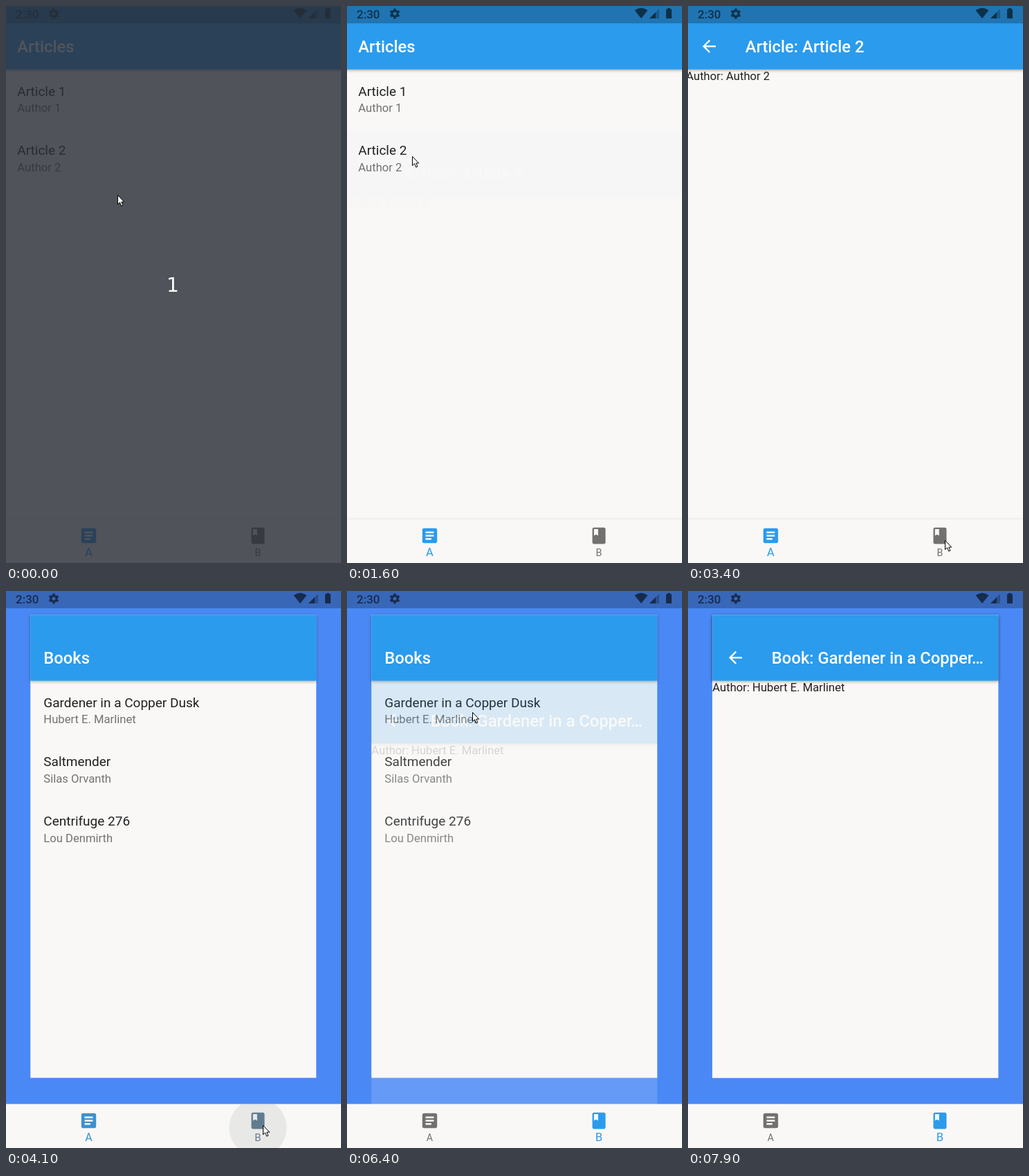
Recreate the animation shown at these times as an HTML page. Size 484 px wide and 805 px high, loop 8000 ms.

```html
<!DOCTYPE html>
<html lang="en">
<head>
<meta charset="utf-8">
<title>Nested navigation</title>
<style>
  html, body { margin: 0; width: 100%; height: 100%; overflow: hidden; background: #f9f8f7; }
  svg { display: block; width: 100vw; height: 100vh; }
  text { font-family: Roboto, sans-serif; }
  .paper { fill: #f9f8f7; }
  .bar { fill: #2b9bed; filter: drop-shadow(0 1.5px 2px rgba(0, 0, 0, .36)); }
  .heading { font-size: 20px; font-weight: 500; fill: #fff; }
  .title { font-size: 16px; fill: rgba(0, 0, 0, .87); }
  .subtitle { font-size: 14px; fill: rgba(0, 0, 0, .54); }
  .body { font-size: 14px; fill: rgba(0, 0, 0, .87); }
  .status { fill: #000; stroke: #000; stroke-width: 0; opacity: .58; }
  .label { text-anchor: middle; }
</style>
</head>
<body>
<svg id="stage" viewBox="0 0 484 805"></svg>
<script>
const LOOP = 8000, STEP = 100;
const SCREEN = { width: 411.4, navTop: 626.9, inset: 32 };
const BLUE = [43, 155, 237], GREY = [115, 113, 112];

const ICONS = {
  article: 'M19 3H5c-1.1 0-2 .9-2 2v14c0 1.1.9 2 2 2h14c1.1 0 2-.9 2-2V5c0-1.1-.9-2-2-2zm-5 14H7v-2h7v2zm3-4H7v-2h10v2zm0-4H7V7h10v2z',
  book: 'M18 2H6c-1.1 0-2 .9-2 2v16c0 1.1.9 2 2 2h12c1.1 0 2-.9 2-2V4c0-1.1-.9-2-2-2zM6 4h5v8l-2.5-1.5L6 12V4z',
  back: 'M20 11H7.83l5.59-5.59L12 4l-8 8 8 8 1.41-1.41L7.83 13H20v-2z'
};

const articles = [['Article 1', 'Author 1'], ['Article 2', 'Author 2']];
const books = [
  ['Gardener in a Copper Dusk', 'Hubert E. Marlinet'],
  ['Saltmender', 'Silas Orvanth'],
  ['Centrifuge 276', 'Lou Denmirth']
];

// Pointer moves: start, end, then the four points of a cubic curve.
const moves = [
  [500, 1000, [161, 273], [139, 254], [116, 236], [94, 217]],
  [2500, 2800, [94, 217], [124, 294], [153, 371], [183, 448]],
  [2900, 3400, [183, 448], [246, 556], [308, 664], [371, 772]],
  [4900, 5800, [371, 772], [540, 690], [512, 260], [181, 175]],
  [7300, 7800, [181, 175], [181, 370], [150, 570], [132, 762]]
];
const POINTER_EXIT = 7900;

const text = (cls, x, y, s) => `<text class="${cls}" x="${x}" y="${y}">${s}</text>`;

function page(width, height, heading, headingX, content) {
  return `<rect class="paper" width="${width}" height="${height}"/>
    <rect class="bar" width="${width}" height="80"/>
    ${text('heading', headingX, 59.3, heading)}${content}`;
}

const listPage = (w, h, heading, items) => page(w, h, heading, 16,
  items.map(([title, author], i) =>
    text('title', 16, 112 + 72 * i, title) + text('subtitle', 16, 132 + 72 * i, author)).join(''));

const detailPage = (w, h, heading, author) => page(w, h, heading, 72,
  `<path d="${ICONS.back}" fill="#fff" transform="translate(16 40)"/>` +
  text('body', 0, 93, 'Author: ' + author));

const tab = (id, icon, label, x) => `<g id="${id}">
  <path d="${ICONS[icon]}" transform="translate(${x - 12} 635)"/>
  <text class="label" x="${x}" y="671.8">${label}</text></g>`;

const { width: W, navTop: H, inset: PAD } = SCREEN;
const cardW = W - 2 * PAD, cardH = H - 2 * PAD;

document.getElementById('stage').innerHTML = `
  <defs><clipPath id="navClip"><rect y="${H}" width="${W}" height="60"/></clipPath></defs>
  <g transform="translate(-2.75 -3.5) scale(1.1886)">
    <g id="articleTab">
      ${listPage(W, H, 'Articles', articles)}
      <g id="articlePage">${detailPage(W, H, 'Article: Article 2', 'Author 2')}</g>
    </g>
    <g id="bookTab">
      <rect width="${W}" height="${H}" fill="#4a89f5"/>
      <g transform="translate(${PAD} ${PAD})">
        ${listPage(cardW, cardH, 'Books', books)}
        <g id="bookPage">${detailPage(cardW, cardH, 'Book: Gardener in a Copper…', books[0][1])}</g>
      </g>
    </g>
    <rect class="paper" y="${H}" width="${W}" height="60"/>
    <rect id="navLine" y="${H - .9}" width="${W}" height=".9" opacity=".07"/>
    <circle id="ripple" cx="${W * .75}" cy="655.6" clip-path="url(#navClip)"/>
    ${tab('tabA', 'article', 'A', W * .25)}
    ${tab('tabB', 'book', 'B', W * .75)}
    <rect width="${W}" height="24" opacity=".25"/>
  </g>
  <g class="status">
    <text x="14" y="17.5" font-size="17" font-weight="500">2:30</text>
    <g fill="none" transform="rotate(15 69 11)">
      <circle cx="69" cy="11" r="4.1" stroke-width="3.2"/>
      <circle cx="69" cy="11" r="6.4" stroke-width="2" pathLength="12" stroke-dasharray="1 1"/>
    </g>
    <path d="M425 18L415.5 6.3Q425 -.7 434.5 6.3Z"/>
    <path d="M437 18H451V4Z" opacity=".4"/>
    <path d="M437 18H446V9Z"/>
    <path d="M461 4.5H463V3H467V4.5H469V18H461Z"/>
  </g>
  <g id="countdown">
    <rect width="484" height="805" fill="rgb(42,46,55)" opacity=".815"/>
    <text x="241" y="413" font-size="28" text-anchor="middle" fill="#fff"
      style="font-family: 'DejaVu Sans', sans-serif">1</text>
  </g>
  <path id="pointer" d="M.5 .5V13.6L3.5 10.8L5.7 16L7.9 15.1L5.8 10.1H9.7Z" fill="#fff" stroke="#000"/>`;

const el = Object.fromEntries([...document.querySelectorAll('#stage [id]')].map(e => [e.id, e]));
const set = (node, attrs) => Object.entries(attrs).forEach(([k, v]) => node.setAttribute(k, v));
const show = (node, on) => { node.style.display = on ? '' : 'none'; };
const clamp = v => Math.min(1, Math.max(0, v));
const mix = (a, b, p) => a + (b - a) * p;
const cubic = (a, b, c, d, u) =>
  (1 - u) ** 3 * a + 3 * u * (1 - u) ** 2 * b + 3 * u * u * (1 - u) * c + u ** 3 * d;

function ease(x1, y1, x2, y2) {
  return p => {
    let low = 0, high = 1;
    for (let i = 0; i < 20; i++) {
      const mid = (low + high) / 2;
      if (cubic(0, x1, x2, 1, mid) < p) low = mid; else high = mid;
    }
    return cubic(0, y1, y2, 1, high);
  };
}
const fastOutSlowIn = ease(.4, 0, .2, 1), easeIn = ease(.42, 0, 1, 1), smooth = ease(.4, 0, .6, 1);

function openPage(node, t, start, height) {
  const p = clamp((t - start) / 300);
  show(node, p > 0);
  set(node, {
    opacity: p === 1 ? 1 : easeIn(p),
    transform: `translate(0 ${p === 1 ? 0 : height * .25 * (1 - fastOutSlowIn(p))})`
  });
}

function paintTab(node, active) {
  node.setAttribute('fill', `rgb(${GREY.map((c, i) => Math.round(mix(c, BLUE[i], active)))})`);
  node.querySelector('text').setAttribute('font-size', mix(12, 14, active));
}

function placePointer(t) {
  const [start, end, ...points] = moves.filter(m => m[0] <= t).pop() || moves[0];
  const u = smooth(clamp((t - start) / (end - start)));
  const [x, y] = [0, 1].map(axis => Math.round(cubic(...points.map(p => p[axis]), u)));
  set(el.pointer, { transform: `translate(${x} ${y})` });
  show(el.pointer, t < POINTER_EXIT);
}

function draw(t) {
  const onBooks = t >= 4100;
  show(el.countdown, t < 100);
  show(el.articleTab, !onBooks);
  show(el.bookTab, onBooks);
  show(el.navLine, !onBooks);
  openPage(el.articlePage, t, 1580, H);
  openPage(el.bookPage, t, 6300, cardH);

  const switched = clamp((t - 4050) / 200);
  paintTab(el.tabA, 1 - switched);
  paintTab(el.tabB, switched);

  const spread = clamp((t - 4100) / 200);
  show(el.ripple, onBooks && spread < 1);
  set(el.ripple, { r: mix(35, 42, spread), opacity: .065 * (1 - spread) });
  placePointer(t);
}

const began = performance.now();
function tick() {
  const t = (performance.now() - began) % LOOP;
  draw(Math.floor(t / STEP) * STEP);
  requestAnimationFrame(tick);
}
tick();
</script>
</body>
</html>
```
